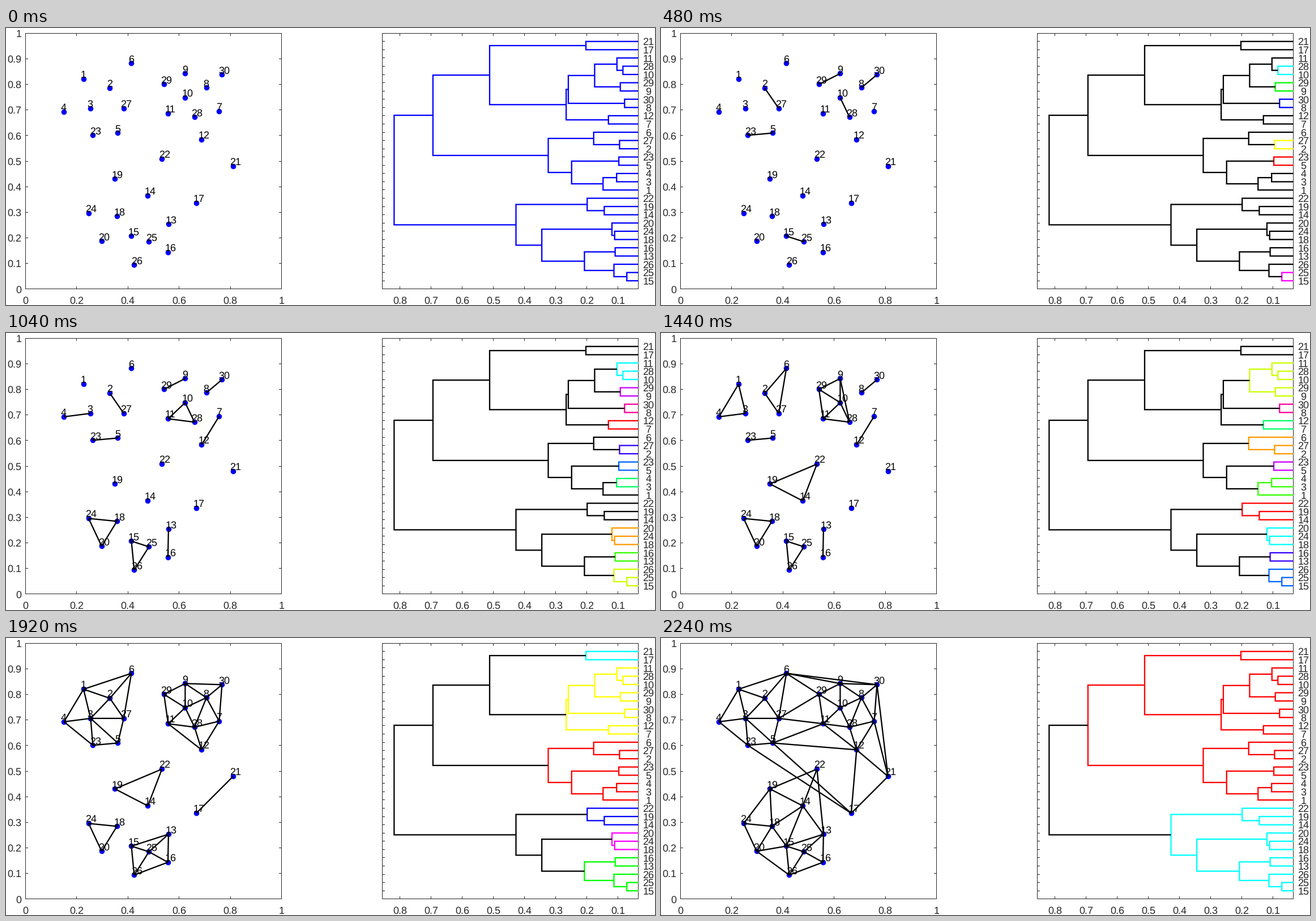
A matplotlib script that plays this animation: 1146x489 px, repeating every 2.32 s.

```python
"""Complete-linkage clustering of 30 points, one merge per frame."""
import colorsys
import math
from itertools import product

import matplotlib.pyplot as plt
import numpy as np
from matplotlib.animation import FuncAnimation
from matplotlib.collections import LineCollection
from matplotlib.tri import Triangulation

W, H, DPI = 1146, 489, 64
PT = 72 / DPI                      # points per pixel
TOP, BOTTOM = 9.2, 460.8
SCATTER_X, TREE_X = 34.5, 664.8    # left edges of the panels
SIDE = 452
GREY = "#262626"
plt.rcParams["text.hinting"] = "none"

# Everything else (tree, leaf order, meshes, colours) follows from these.
POINTS = 0.4 + np.array([
    (136.5, 90), (183, 106), (149, 141.5), (102, 147.5), (197, 185),
    (221, 62), (376, 146.5), (353.5, 105), (316, 80), (316, 122.5),
    (286, 151), (345, 197), (286.5, 346), (250, 296), (221, 367),
    (285.5, 395.5), (335.5, 309), (195.5, 332), (192, 266), (168.5, 376),
    (400.5, 244), (275, 231), (153, 189), (145.5, 327), (252, 377),
    (226, 418), (207.5, 141.5), (332.5, 157), (278.5, 99), (381, 82)])
N = len(POINTS)


class Node:
    def __init__(self, members, height=0, kids=()):
        self.members, self.height, self.kids = members, height, kids


def link():
    """Merge the two closest clusters until one is left."""
    gaps = np.hypot(*(POINTS[:, None] - POINTS[None]).transpose(2, 0, 1)) / SIDE
    live = [Node([i]) for i in range(N)]
    merges = []
    while len(live) > 1:
        height, a, b = min(
            (max(gaps[i, j] for i, j in product(p.members, q.members)), m, n)
            for m, p in enumerate(live) for n, q in enumerate(live[:m]))
        p, q = live[a], live[b]
        node = Node(p.members + q.members, height, (p, q))
        live = [c for c in live if c is not p and c is not q] + [node]
        merges.append(node)
    return merges


MERGES = link()
LOW, HIGH = MERGES[0].height, MERGES[-1].height
SPAN = 1.1 * (HIGH - LOW)
H_MAX = HIGH + 0.05 * (HIGH - LOW)
FIRST = min(MERGES[0].members)


def rank(node):
    """The tightest pair's branch goes first, then the lowest number."""
    return -1 if FIRST in node.members else min(node.members)


def leaf_order(node):
    if not node.kids:
        return node.members
    return [i for kid in sorted(node.kids, key=rank) for i in leaf_order(kid)]


LEAVES = leaf_order(MERGES[-1])


def leaf_y(place):
    return BOTTOM - (place + 1) * (BOTTOM - TOP) / (N + 1)


def node_y(node):
    if not node.kids:
        return leaf_y(LEAVES.index(node.members[0]))
    return sum(map(node_y, node.kids)) / 2


def tree_x(height):
    return TREE_X + min((H_MAX - height) / SPAN, 1) * SIDE


def bracket(node):
    p, q = node.kids
    x, yp, yq = tree_x(node.height), node_y(p), node_y(q)
    return [(tree_x(p.height), yp), (x, yp), (x, yq), (tree_x(q.height), yq)]


def mesh(node):
    """Delaunay edges of one cluster."""
    pts = POINTS[node.members]
    if len(pts) == 2:
        return [pts]
    return [pts[e] for e in Triangulation(*pts.T).edges]


MESHES = [mesh(m) for m in MERGES]

fig = plt.figure(figsize=(W / DPI, H / DPI), dpi=DPI, facecolor="white")
ax = fig.add_axes([0, 0, 1, 1])
ax.set(xlim=(0, W), ylim=(H, 0))
ax.axis("off")


def label(x, y, text, ha="center", color=GREY):
    """Text whose digits are centred on y."""
    ax.text(x, y + 6.6, text, ha=ha, va="baseline", color=color,
            family="Liberation Sans", fontsize=18 * PT, zorder=3)


def stroke(*pts):
    """Thin line through pixel centres."""
    xy = np.floor(pts) + 0.5
    ax.plot(*xy.T, color=GREY, lw=PT, zorder=1, snap=False,
            solid_capstyle="projecting", solid_joinstyle="miter")


def panel(x0, xticks, yticks, tick=4):
    x1 = x0 + SIDE
    stroke((x0, TOP), (x1, TOP), (x1, BOTTOM), (x0, BOTTOM), (x0, TOP))
    for x in xticks:
        stroke((x, BOTTOM), (x, BOTTOM - tick))
        stroke((x, TOP), (x, TOP + tick))
    for y in yticks:
        stroke((x0, y), (x0 + tick, y))
        stroke((x1, y), (x1 - tick, y))


# Scatter panel
x_marks = [SCATTER_X + SIDE * i / 5 for i in range(6)]
y_marks = [BOTTOM - (BOTTOM - TOP) * i / 10 for i in range(11)]
panel(SCATTER_X, x_marks, y_marks)
for i, x in enumerate(x_marks):
    label(x, 480, f"{i / 5:g}")
for i, y in enumerate(y_marks):
    label(27.2, y, f"{i / 10:g}", "right")
ax.scatter(*POINTS.T, s=(9.6 * PT) ** 2, color="blue", lw=0, zorder=2)
for i, (x, y) in enumerate(POINTS):
    label(x - 5.6, y - 8.6, str(i + 1), "left", "black")

# Tree panel
h_marks = [tree_x(i / 10) for i in range(1, math.floor(H_MAX * 10) + 1)]
panel(TREE_X, h_marks, [leaf_y(i) for i in range(N)])
for i, x in enumerate(h_marks):
    label(x, 480, f"{(i + 1) / 10:g}")
for place, i in enumerate(LEAVES):
    label(1134.3, leaf_y(place), str(i + 1))

edges = LineCollection([], colors="black", linewidths=2.3 * PT, zorder=4)
tree = LineCollection([bracket(m) for m in MERGES], linewidths=2.3 * PT,
                      zorder=4, joinstyle="miter", capstyle="butt")
for lines in (edges, tree):
    lines.set_snap(False)
    ax.add_collection(lines, autolim=False)


def draw(k):
    """State after k merges; clusters take hues from newest to oldest."""
    inner = {kid for m in MERGES[:k] for kid in m.kids}
    roots = [i for i in reversed(range(k)) if MERGES[i] not in inner]
    edges.set_segments([e for i in roots for e in MESHES[i]])

    colors = ["black" if k else "blue"] * len(MERGES)
    for n, r in enumerate(roots):
        group = set(MERGES[r].members)
        for i in range(r + 1):
            if group.issuperset(MERGES[i].members):
                colors[i] = colorsys.hsv_to_rgb(n / len(roots), 1, 1)
    tree.set_color(colors)
    return edges, tree


anim = FuncAnimation(fig, draw, frames=len(MERGES), interval=80, repeat=True,
                     repeat_delay=0, blit=False)
plt.show()
```
